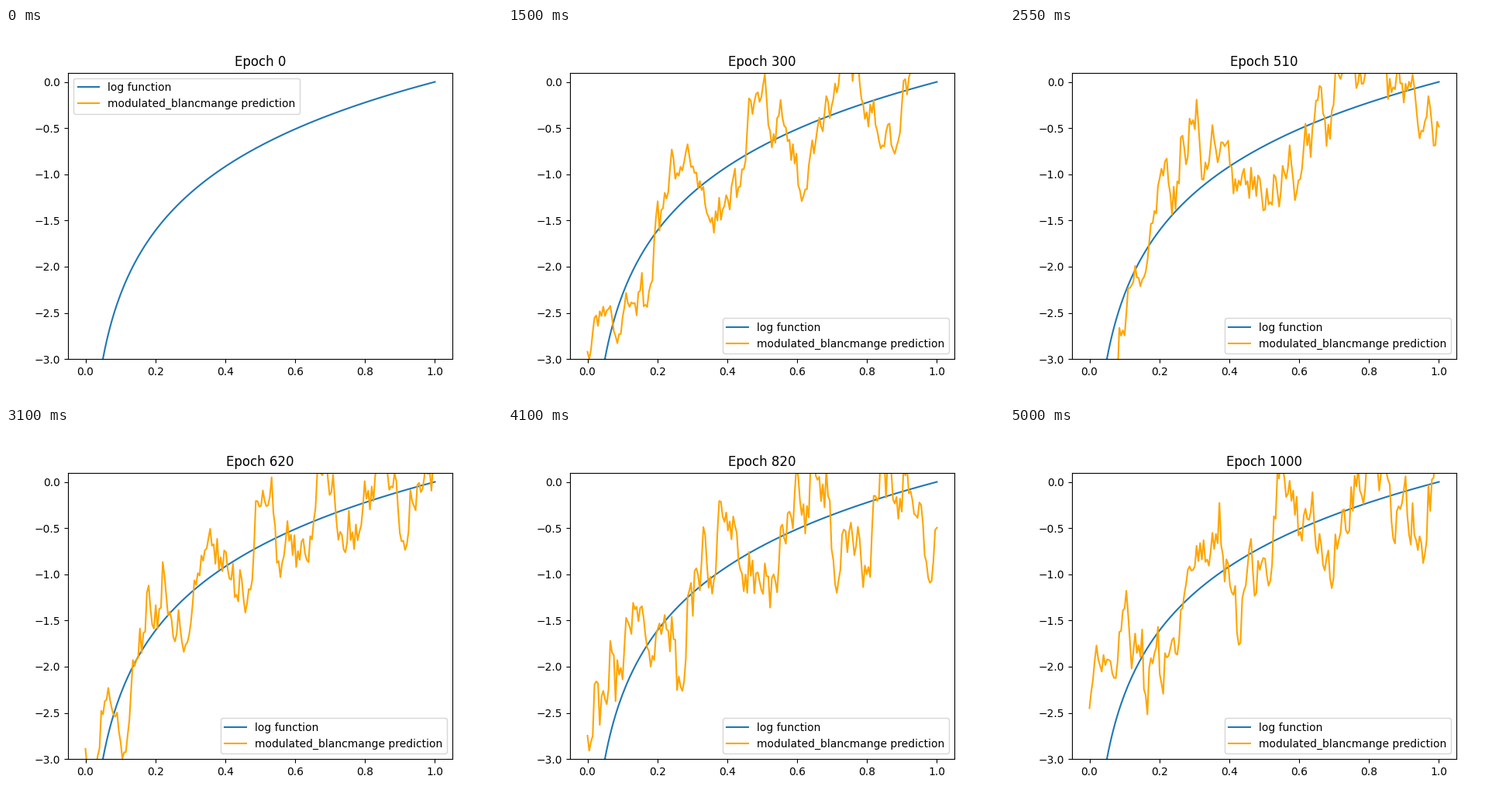
Write a matplotlib script that moves like this. It is 640 px wide and 480 px high and loops after 5050 ms.

```python
import numpy as np
import matplotlib.pyplot as plt
from matplotlib.animation import FuncAnimation

FRAMES = 101
INTERVAL = 50
EPOCHS_PER_FRAME = 10
LEGEND_MOVES = 3
FIRST_FIT = 14

x = np.linspace(0, 1, 200)
log_curve = np.log(np.maximum(x, 1e-6))

# time, floor, ceiling, swell frequency, swell peak, swell height, roughness
KEYS = np.array([
    [0, 0.90, 0.90, 2.3, 0.42, 0.10, 0.3],
    [FIRST_FIT, -2.10, -0.45, 2.3, 0.42, 0.20, 0.5],
    [30, -3.20, 0.00, 4.2, 0.50, 0.50, 0.9],
    [51, -3.20, 0.00, 2.0, 0.28, 0.55, 1.1],
    [62, -3.20, 0.00, 6.2, 0.52, 0.40, 1.1],
    [82, -2.10, -0.40, 4.0, 0.38, 0.45, 1.4],
    [100, -2.10, -0.10, 4.2, 0.33, 0.45, 1.3],
])

OCTAVES = 4
phases, speeds = np.random.default_rng(7).uniform(-1, 1, (2, OCTAVES))


def tri(v):
    """Zero-mean triangle wave of period 1."""
    return np.abs(v - np.round(v)) - 0.25


def roughness(t):
    """Blancmange sum whose octaves drift and swell along x."""
    total = np.zeros_like(x)
    for n in range(OCTAVES):
        mod = 1 + 0.6 * np.sin(2 * np.pi * ((n + 2) * x + 0.03 * t + phases[n]))
        total += 0.75 ** n * mod * tri(11.3 * 2 ** n * x + phases[n] + 0.1 * speeds[n] * t)
    return 0.8 * total


def settle(t):
    """Fast start that slows down towards the first fit."""
    if t >= FIRST_FIT:
        return t
    return FIRST_FIT * (1 - np.exp(-3 * t / FIRST_FIT)) / (1 - np.exp(-3))


def prediction(t):
    now = settle(t)
    low, high, freq, peak, height, rough = (
        np.interp(now, KEYS[:, 0], column) for column in KEYS[:, 1:].T)
    swell = height * np.cos(2 * np.pi * freq * (x - peak))
    return np.clip(log_curve, low, high) + swell + rough * roughness(t)


fig, ax = plt.subplots(figsize=(6.4, 4.8), dpi=100)


def draw(t):
    ax.clear()
    ax.plot(x, log_curve, label="log function")
    ax.plot(x, prediction(t), color="orange",
            label="modulated_blancmange prediction")
    ax.set_xlim(-0.05, 1.05)
    ax.set_ylim(-3, 0.1)
    ax.set_title(f"Epoch {t * EPOCHS_PER_FRAME}")
    ax.legend(loc="upper left" if t < LEGEND_MOVES else "lower right")
    return ax.lines


anim = FuncAnimation(fig, draw, frames=FRAMES, init_func=lambda: draw(0),
                     interval=INTERVAL, repeat=True, repeat_delay=0)
plt.show()
```
